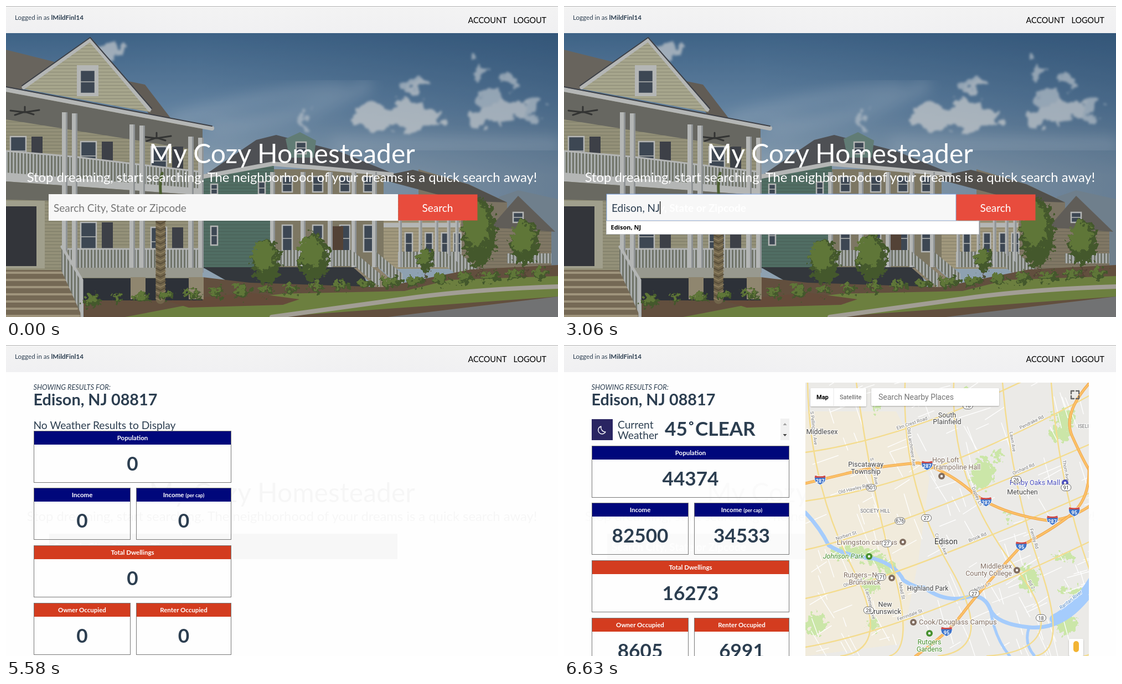
An HTML page for the animation above (8 s loop, 997 by 562 pixels).

```html
<!DOCTYPE html>
<html lang="en">
<head>
<meta charset="utf-8">
<title>Neighborhood search</title>
<style>
html, body { margin: 0; width: 100%; height: 100%; overflow: hidden; background: #fefefe; }
svg { display: block; font-family: Lato, sans-serif; fill: #2c3e50; }
text { white-space: pre; }
.mid { text-anchor: middle; }
.b { font-weight: 700; }
.map { font-family: Roboto, sans-serif; }
.halo text { stroke: #fff; stroke-width: 2.5; stroke-opacity: .8; paint-order: stroke; stroke-linejoin: round; }
.line { fill: none; stroke-linejoin: round; stroke-linecap: round; }
</style>
</head>
<body>
<svg id="stage" width="997" height="562" viewBox="0 0 997 562"></svg>
<script>
let seed = 7;
const rnd = (from = 0, to = 1) => from + (to - from) * (seed = seed * 16807 % 2147483647) / 2147483647;
const times = (n, f) => Array.from({ length: n }, (_, i) => f(i)).join('');
const rect = (x, y, w, h, fill, more = '') => `<rect x="${x}" y="${y}" width="${w}" height="${h}" fill="${fill}" ${more}/>`;
const poly = (points, fill, more = '') => `<polygon points="${points}" fill="${fill}" ${more}/>`;
const line = (d, stroke, w = 1, more = '') => `<path class="line" d="${d}" stroke="${stroke}" stroke-width="${w}" ${more}/>`;
const oval = (x, y, rx, ry, fill) => `<ellipse cx="${x}" cy="${y}" rx="${rx}" ry="${ry}" fill="${fill}"/>`;
const text = (x, y, size, s, more = '') => `<text x="${x}" y="${y}" font-size="${size}" ${more}>${s}</text>`;
const mid = 'class="mid"', midBold = 'class="mid b"';

// ---------- street scene ----------
const trim = '#d2d3d0', shadow = '#40434a';
const clad = (points, color) => poly(points, color) + poly(points, 'url(#siding)');
const rail = points => poly(points, 'url(#balusters)');
const pane = (x, y, w, h) => rect(x, y, w, h, '#414c59', `stroke="${trim}" stroke-width="2.5"`) + line(`M${x} ${y + h / 2}h${w}`, trim, 1.5);
// Spacing shrinks with distance, as in perspective.
const receding = (x, step, shrink) => i => x + step * i - shrink * i * i;
const column = (x, y, h, w = 9) => rect(x, y, w, h, trim) + rect(x + w - 3, y, 3, h, '#a4a8aa');
const fan = (x, y) => line(`M${x} ${y - 8}v8M${x - 26} ${y - 1}l26 3l26-4M${x - 18} ${y + 7}l18-6l16 5`, '#343432', 3);
const foliage = (x, y, rx, ry) => oval(x, y, rx, ry, '#48602b') + oval(x - rx * .2, y - ry * .25, rx * .75, ry * .65, '#6a8538');
const tree = (x, top, base, r) => line(`M${x} ${top + 20}V${base}`, '#5a4a36', 2.5) + foliage(x, (top + base) / 2 - 12, r, (base - top) / 2 - 8);

const sky = () => rect(0, 49, 997, 513, 'url(#sky)') + rect(0, 49, 997, 300, 'url(#shade)') +
  '<g filter="url(#cloud)" opacity=".75">' + oval(708, 200, 85, 26, '#e4e8ea') + oval(895, 192, 62, 20, '#dde3e8') + oval(748, 146, 26, 9, '#dde3e8') + oval(188, 82, 24, 14, '#dde3e8') +
  times(10, i => oval(rnd(540, 990), rnd(110, 210), rnd(8, 18), rnd(6, 12), '#c9d6e1')) + '</g>' +
  line('M310 205Q460 160 600 150M380 220Q530 205 650 145M600 250H990', '#c3d3e2', 26, 'opacity=".28" filter="url(#haze)"');

const farHouses = () => {
  const post = receding(709, 40, 3.6);
  return poly('890,345 925,333 997,349 997,470 890,470', '#7d909f') +
    poly('745,295 835,322 905,355 905,470 745,470', '#8c816c') + poly('665,310 735,296 835,322 905,355 822,352', '#5a5650') +
    clad('822,395 985,405 985,480 822,480', '#92866e') + poly('875,400 925,343 992,408', '#6b665f') + pane(916, 373, 18, 18) +
    rail('905,447 985,447 985,465 905,465') + clad('680,345 822,352 822,475 680,475', '#b9ad8b') + rect(680, 392, 140, 8, trim) +
    times(4, i => pane(post(i) + 12, 410, 13, 38)) + rail('708,444 820,444 820,472 708,472') + times(5, i => column(post(i), 348, 124, 6));
};

const greenHouse = () => {
  const post = receding(477, 58, 3);
  return clad('355,305 484,285 484,474 355,474', '#587a6c') + rect(484, 295, 198, 178, '#8f866c') +
    poly('355,308 452,242 488,233 600,262 700,303 482,283', '#55575a') +
    poly('505,240 531,228 560,243 556,274 512,274', '#6c8c83') + pane(524, 246, 18, 21) +
    poly('352,305 482,281 700,301 700,308 482,289 352,313', trim) + pane(370, 398, 12, 34) + pane(370, 322, 12, 18) + pane(456, 318, 12, 22) +
    times(4, i => pane(post(i) + 22, 308, 18, 28) + pane(post(i) + 22, 396, 18, 48)) + rect(587, 398, 22, 72, '#5b4636') +
    rail('482,441 628,441 628,470 484,470') + times(5, i => column(post(i), 300, 172)) +
    poly('355,472 640,472 655,508 410,503', '#34383d') + poly('628,473 672,473 716,512 672,512', '#a29379') +
    [0, 40, 165, 188].map(dx => `${628 + dx},444 ${676 + dx},484 ${676 + dx},510 ${628 + dx},468`).map(rail).join('');
};

const porchHouse = () => {
  const post = receding(106, 130, 8);
  return clad('0,150 355,218 355,492 0,492', '#a9a586') + poly('0,155 355,222 355,262 0,205', '#74736a') +
    poly('0,79 88,101 32,150 0,150', '#756f65') + poly('212,134 251,142 300,206 262,200', '#6d655c') +
    clad('152,60 32,150 262,192', '#c1be9f') + line('M32 147L152 61L259 187', trim, 7) + line('M29 144L152 57L263 185', shadow, 2) +
    rect(128, 107, 39, 56, trim) + pane(134, 116, 27, 42) + line('M0 151L372 221', trim, 8) + line('M0 146L372 217', shadow, 2) +
    fan(34, 190) + fan(272, 237) +
    [236, 382].map((y, floor) => times(3, i => pane(8 + 127 * i, y + 9 * i, 28, 52) + rect(46 + 127 * i, y + 9 * i, 20, 60, shadow))).join('') +
    rail('0,262 120,272 355,300 355,332 0,302') + line('M0 262L120 272L355 300', trim, 3) +
    poly('0,301 355,330 355,342 0,317', trim) + poly('0,317 355,342 355,358 0,350', '#76756a') +
    rect(0, 352, 70, 122, '#b9b79f') + rect(0, 362, 55, 108, '#35363a') +
    rail('112,440 355,440 355,473 112,473') + line('M112 439H355', trim, 3) + times(3, i => column(post(i) - 5, 192 + 22 * i, 290 - 22 * i, 10) + column(post(i) + 13, 194 + 22 * i, 288 - 22 * i, 10)) +
    rect(112, 473, 243, 18, '#b0afa2') + rect(135, 492, 220, 40, '#2d3138') + times(2, i => rect(225 + 105 * i, 490, 27, 40, '#a5987b')) +
    poly('0,477 105,477 138,562 0,562', '#85755c') + times(7, i => line(`M0 ${482 + i * 13}H${108 + i * 4}`, '#b8aa8b', 4)) +
    rail('100,436 137,496 137,560 100,478') + line('M101 435L137 495V562', trim, 5);
};

const palm = () => line('M279 355V530', '#80704f', 17) + times(24, i => line(`M271 ${390 + i * 6}l8 4l9-5`, i % 2 ? '#a08e68' : '#62543b', 2)) + line('M281 355Q276 320 282 302', '#52682f', 5);

const scene = () => sky() + farHouses() + greenHouse() +
  poly('140,530 355,490 440,500 680,508 840,476 997,468 997,562 140,562', '#6e553f') +
  poly('215,562 330,540 500,520 720,515 800,495 997,488 997,525 480,562', '#7a9040') + poly('290,533 440,518 530,530 500,540 330,545', '#71513b') +
  line('M480 562Q600 546 720 529T997 507', '#bcb6aa', 8) + poly('690,562 997,525 997,562', '#808080') + porchHouse() + palm() +
  '<g filter="url(#rough)">' + times(19, i => foliage(155 + i * 45, 532 - i * 2.7, rnd(9, 20), rnd(7, 12))) +
  tree(470, 424, 522, 26) + tree(556, 415, 517, 28) + tree(757, 440, 500, 14) + tree(855, 352, 492, 31) + tree(937, 390, 488, 26) + '</g>' +
  rect(0, 49, 997, 513, '#30343a', 'opacity=".18"');

// ---------- home ----------
const title = 'My Cozy Homesteader', prompt = 'Search City, State or Zipcode', typed = 'Edison, NJ';
const banner = color => `<g fill="${color}">` + text(498.5, 284, 48, title, mid) +
  text(498.5, 318, 23.8, 'Stop dreaming, start searching. The neighborhood of your dreams is a quick search away!', mid) + '</g>';
const option = (s, i) => text(84.5, 404 + i * 23, 11, s, 'class="b" fill="#000" font-family="Open Sans, sans-serif"');
const home = () => scene() + banner('#fff') +
  rect(77, 340, 631, 48, '#f7f7f7', 'id="field"') + text(86, 372, 19, prompt, 'id="hint"') +
  rect(79, 345, 0, 38, '#f7f7f7', 'id="cover"') + text(86, 372, 19, '', 'id="entry"') + rect(0, 353, 1.3, 23, '#111', 'id="caret"') +
  rect(708.5, 340.5, 143, 47, '#e84c3d', 'id="button"') + text(779.5, 372, 19, 'Search', mid + ' fill="#fff"') +
  '<g id="menu">' + rect(76.5, 388.5, 673, 93, '#fff', 'id="sheet" stroke="#c4c7cb"') +
  `<g id="many">${['East Brunswick, NJ', 'East Brunswick NJ', 'East Brunswick, nJ', typed].map(option).join('')}</g><g id="one">${option(typed, 0)}</g></g>`;

// ---------- results ----------
const navy = '#00077b', red = '#d33c1f';
const panel = (x, w, row, color, label) => {
  const y = Math.floor(row * 103.8);
  return rect(x + .5, y + .5, w - 1, 93, 'none', 'stroke="#777"') + rect(x + 1, y + 1, w - 2, 24, color) +
    text(x + w / 2, y + 17, 11.5, label, midBold + ' fill="#fff"') + text(x + w / 2, y + 72, 35.2, '0', midBold + ' data-total');
};
const results = () => rect(0, 49, 997, 513, '#fefefe') +
  `<g id="ghost">${rect(78, 341, 629, 46, '#f5f5f5')}${banner('#f4f4f4')}${text(86, 372, 19, prompt, 'class="b" fill="#fff"')}</g>` +
  `<g id="empty">${text(228, 103, 38.4, 'No Location to', mid)}${text(228, 143, 38.4, 'Display', mid)}${text(692, 103, 38.4, 'No Location to Display', mid)}</g>` +
  `<g id="place">${text(49.5, 80.5, 12.8, 'SHOWING RESULTS FOR:', 'font-style="italic"')}${text(49.5, 109, 28.8, 'Edison, NJ 08817', 'class="b"')}</g>` +
  text(49.5, 167, 19.2, 'No Weather Results to Display', 'id="noWeather"') +
  '<g id="weather">' + rect(50, 134, 38, 38, '#2a2562') + line('M67 147a7 7 0 1 0 8 10a8 8 0 0 1-8-10z', '#fff', 1.3) +
  text(97, 151, 19.2, 'Current') + text(97, 170, 19.2, 'Weather') + text(182, 164, 35.2, '45˚CLEAR', 'class="b"') +
  rect(391, 133, 16, 39, '#f1f1f1') + poly('395.5,145 402.5,145 399,141', '#a0a0a0') + poly('395.5,161 402.5,161 399,165', '#444') + '</g>' +
  '<g id="panels">' + panel(50, 357, 0, navy, 'Population') + panel(50, 175, 1, navy, 'Income') +
  panel(235, 172, 1, navy, 'Income <tspan font-size="9">(per cap)</tspan>') + panel(50, 357, 2, red, 'Total Dwellings') +
  panel(50, 175, 3, red, 'Owner Occupied') + panel(235, 172, 3, red, 'Renter Occupied') + '</g>' +
  rect(436, 68, 512, 494, '#e5e3df', 'id="blank"') + `<g id="map" class="map" clip-path="url(#mapClip)">${cityMap()}</g>`;

// ---------- map ----------
const label = (x, y, s, color = '#444', size = 12.5, anchor = 'middle', more = '') => s.split('|').map((row, i) =>
  text(x, y + i * 12.8, size, row, `fill="${color}" text-anchor="${anchor}" ${more}`)).join('');
const pin = (x, y, color) => oval(x, y, 6, 6, color) + oval(x, y, 2.2, 2.2, '#fff');
const shield = ({ x, y }, n) => `<g transform="translate(${x} ${y})"><path d="M-9-8Q0-5 9-8Q14 3 0 9Q-14 3-9-8Z" fill="#3d73c9" stroke="#fff"/><path d="M-9-8Q0-5 9-8L10-4H-10Z" fill="#d24a43"/>${text(0, 5, 9, n, midBold + ' fill="#fff"')}</g>`;
const badge = ({ x, y }, n) => rect(x - 9, y - 6, 18, 12, '#fff', 'rx="6" stroke="#666"') + text(x, y + 3.5, 9, n, mid + ' fill="#333"');
const along = (d, part) => {
  const path = document.createElementNS('http://www.w3.org/2000/svg', 'path');
  path.setAttribute('d', d);
  return path.getPointAtLength(path.getTotalLength() * part);
};
const street = (d, part, name) => {
  const a = along(d, part), b = along(d, part + .02);
  return text(0, -3, 8.5, name, `fill="#777" text-anchor="middle" transform="translate(${a.x} ${a.y}) rotate(${Math.atan((b.y - a.y) / (b.x - a.x)) * 57.3})"`);
};

function cityMap() {
  const brown = '#806d60', green = '#47902f', violet = '#4c50bd';
  const west = 'M436 250Q470 242 515 231T640 213Q690 225 735 264T872 317Q910 317 948 292';
  const north = 'M635 562Q690 525 720 485T827 362Q880 335 915 307T948 222';
  const highway = d => line(d, '#ef9f45', 5) + line(d, '#fbc167', 3.4);
  const water = (d, w) => line(d, '#a5ccfc', w);
  const names = ['S Pellington Ave', 'Elm Crest Road', 'S Tarvon Ave', 'Old Hawley Rd', 'Old Larchmere Ave', 'Norbert St', 'Dapley Ln', 'Olwen Rd', 'Lawn Ave', 'Ferrindale St', 'Thorn Ave', 'Larchmere Ave', 'Farlow Rd', 'Mead St', 'Pendrake Rd', 'Corwin Ave', 'Orchard Rd', 'Rd 2', 'Brook Rd', 'Fernby Rd', 'Arbor Ln', 'Mead St'];
  const routes = [28, 18, 27, 501, 27, 676, 18, 171, 26, 27, 91];
  const roads = routes.map((_, i) => {
    const x = 440 + i * 44, y = 90 + i * 44;
    return i % 2 ? `M436 ${y + 60}Q${rnd(560, 680)} ${y + 30} 948 ${y - 130}` : `M${x} 68Q${x + rnd(-10, 30)} 250 ${x + rnd(60, 110)} 400T${x + 60} 562`;
  });
  const places = [[682, 237, brown], [612, 356, brown], [592, 421, brown], [818, 407, brown], [631, 501, brown], [905, 249, violet], [551, 382, green], [660, 521, green]];
  return rect(436, 68, 512, 494, '#ebeae7') + poly('436,120 600,120 660,240 640,390 610,540 436,562', '#f1ebdc') +
    '<g filter="url(#rough)">' + times(14, () => oval(rnd(436, 948), rnd(68, 562), rnd(6, 20), rnd(6, 20), '#cbe6a8')) + oval(755, 232, 22, 28, '#cbe6a8') + oval(840, 423, 18, 24, '#cbe6a8') + line('M495 375Q550 368 590 405', '#cbe6a8', 22) + '</g>' +
    times(170, () => {
      const a = rnd(0, .35) + (rnd() < .5 ? -.6 : 1), r = rnd(15, 60);
      return line(`M${rnd(436, 948)} ${rnd(68, 562)}l${r * Math.cos(a)} ${r * Math.sin(a)}`, '#fff', 1.3);
    }) +
    water('M436 303Q462 330 478 362Q510 382 560 386Q600 398 613 425Q636 440 650 438Q690 468 735 454Q760 452 770 478T840 510T948 455', 7) +
    water('M770 478Q778 530 805 562M840 510Q830 540 850 562', 5) + water('M885 495Q925 475 955 425', 16) +
    roads.map(d => line(d, '#f4dc8e', 2.4)).join('') + highway('M948 70Q900 125 918 165T948 225') + highway(west) + highway(north) +
    '<g class="halo">' + names.map((name, i) => street(roads[i % 11], i < 11 ? rnd(.1, .4) : rnd(.55, .85), name)).join('') +
    text(0, 0, 9, 'Raritan River', 'fill="#4d86c7" font-style="italic" text-anchor="middle" transform="translate(917 463) rotate(-38)"') +
    label(692, 130.5, 'South|Plainfield') + label(466, 161, 'Middlesex') + label(545, 220, 'Piscataway|Township') + label(828, 270, 'Metuchen') +
    label(562, 303, 'SOCIETY HILL', '#666', 8.5) + label(938, 150, 'ISELI', '#666', 8.5) +
    label(690, 360, 'Edison', '#333', 14) + label(657, 444, 'Highland Park', '#444', 12) + label(580, 473, 'New|Brunswick') +
    label(665, 212, 'Hop Loft|Trampoline Hall', brown, 12.5, 'start') + label(896, 253, 'Fenby Oaks Mall', violet, 12.5, 'end') +
    label(602, 361, 'Livingston campus', brown, 13, 'end') + label(542, 386, 'Johnson Park', green, 12.5, 'end', 'font-style="italic"') +
    label(543, 420, 'Rutgers–New|Brunswick', brown) + label(809, 404, 'Middlesex|County College', brown, 12.5, 'end') +
    label(641, 505, 'Cook/Douglass Campus', brown, 13, 'start') + label(660, 541, 'Rutgers|Gardens', green) + '</g>' +
    places.map(p => pin(...p)).join('') + routes.map((n, i) => badge(along(roads[i], rnd(.2, .8)), n)).join('') +
    [.05, .41, .64, .87].map(part => shield(along(west, part), 287)).join('') + [.15, .58, .82].map(part => shield(along(north, part), 95)).join('') +
    '<g filter="url(#drop)">' + rect(445, 78, 101, 33, '#fff', 'rx="2"') + rect(555, 78, 231, 32, '#fff', 'rx="2"') + rect(912, 531, 26, 31, '#fff', 'rx="2"') + '</g>' +
    line('M487 78V111', '#e8e8e8') + text(456, 98, 11, 'Map', 'class="b" fill="#000"') + text(498, 98, 11, 'Satellite', 'fill="#565656"') + text(568, 99, 14, 'Search Nearby Places', 'fill="#757575"') +
    line('M916 88V83H921M925 83H930V88M930 92V97H925M921 97H916V92', '#666', 2.4) + rect(920, 535, 10, 20, '#f2b434', 'rx="5"');
}

document.getElementById('stage').innerHTML = `<defs>
<linearGradient id="sky" x2="0" y2="1"><stop stop-color="#426d97"/><stop offset=".25" stop-color="#6a90b4"/><stop offset=".5" stop-color="#a3b9cb"/></linearGradient>
<linearGradient id="shade"><stop offset=".35" stop-color="#1c4169" stop-opacity="0"/><stop offset="1" stop-color="#1c4169" stop-opacity=".35"/></linearGradient>
<linearGradient id="bar" x2="0" y2="1"><stop stop-color="#f3f3f3"/><stop offset="1" stop-color="#f0f0f2"/></linearGradient>
<pattern id="balusters" width="6" height="8" patternUnits="userSpaceOnUse"><path d="M0 0h3v8h-3z" fill="#c6c9c8"/><path d="M3 0h3v8h-3z" fill="#7f8274"/></pattern>
<pattern id="siding" width="8" height="6" patternUnits="userSpaceOnUse"><path d="M0 5h8v1h-8z" fill="#35372f" opacity=".25"/></pattern>
<filter id="rough"><feTurbulence type="fractalNoise" baseFrequency=".12" numOctaves="3"/><feDisplacementMap in="SourceGraphic" scale="28" xChannelSelector="R" yChannelSelector="G"/></filter>
<filter id="cloud"><feTurbulence type="fractalNoise" baseFrequency=".03" numOctaves="4"/><feDisplacementMap in="SourceGraphic" scale="60" xChannelSelector="R" yChannelSelector="G"/><feGaussianBlur stdDeviation="2"/></filter>
<filter id="haze"><feGaussianBlur stdDeviation="12"/></filter>
<filter id="drop"><feDropShadow dx="0" dy="1" stdDeviation="1" flood-opacity=".3"/></filter>
<clipPath id="mapClip"><path d="M436 68h512v494h-512z"/></clipPath></defs>
<g id="home">${home()}</g><g id="results">${results()}</g>` +
  rect(0, 0, 997, 49, 'url(#bar)') + rect(0, 0, 997, 1, '#b5b5b5') +
  text(16, 25, 11.6, 'Logged in as <tspan class="b">lMildFinl14</tspan>') +
  text(834.5, 31, 14.4, 'ACCOUNT', 'fill="#000"') + text(916.5, 31, 14.4, 'LOGOUT', 'fill="#000"');

// ---------- timeline ----------
const $ = Object.fromEntries([...document.querySelectorAll('#stage [id]')].map(e => [e.id, e]));
const totals = [...document.querySelectorAll('[data-total]')];
const finals = [44374, 82500, 34533, 16273, 8605, 6991];
const keys = [1860, 2130, 2213, 2295, 2378, 2460, 2640, 2730, 2970, 3060];
const show = (e, on) => e.style.display = on ? '' : 'none';
const set = (e, attrs) => { for (const k in attrs) if (e.getAttribute(k) !== `${attrs[k]}`) e.setAttribute(k, attrs[k]); };

function drawHome(t) {
  const count = keys.filter(k => k <= t).length, focused = t >= 1410 && t < 4560;
  set($.field, { stroke: focused ? '#7ea6e8' : 'none' });
  set($.hint, t < 1410 ? { fill: '#777', class: '' } : { fill: '#fff', class: 'b' });
  $.entry.textContent = typed.slice(0, count);
  const end = 86 + (count ? $.entry.getComputedTextLength() : 0);
  set($.cover, { width: count ? end - 79 : 0 });
  set($.caret, { x: Math.round(end) });
  show($.caret, focused && !(t >= 3570 && t < 4080));
  set($.button, { fill: t < 3780 ? '#e84c3d' : '#b82215', stroke: t < 4560 ? 'none' : '#6e72c4' });
  show($.menu, count && focused);
  show($.many, count === 1);
  show($.one, count > 1);
  set($.sheet, { height: count === 1 ? 93 : 24 });
  set($.menu, { opacity: t < 1950 ? .5 : 1 });
}

function drawResults(t) {
  const found = t >= 5520, forecast = t >= 5970, counted = t >= 6150;
  show($.empty, !found);
  show($.place, found);
  show($.noWeather, !forecast);
  show($.weather, forecast);
  set($.noWeather, { y: found ? 152 : 167 });
  set($.panels, { transform: `translate(0 ${forecast ? 182 : found ? 155 : 170})` });
  totals.forEach((e, i) => e.textContent = counted ? finals[i] : 0);
  show($.blank, t >= 5820);
  set($.map, { opacity: Math.min(1, Math.max(0, (t - 5970) / 500)) });
  set($.ghost, { opacity: counted ? .35 : found ? .7 : 1 });
}

function frame() {
  const t = performance.now() % 8000, searching = t < 4980;
  show($.home, searching);
  show($.results, !searching);
  (searching ? drawHome : drawResults)(t);
  requestAnimationFrame(frame);
}
frame();
</script>
</body>
</html>
```
